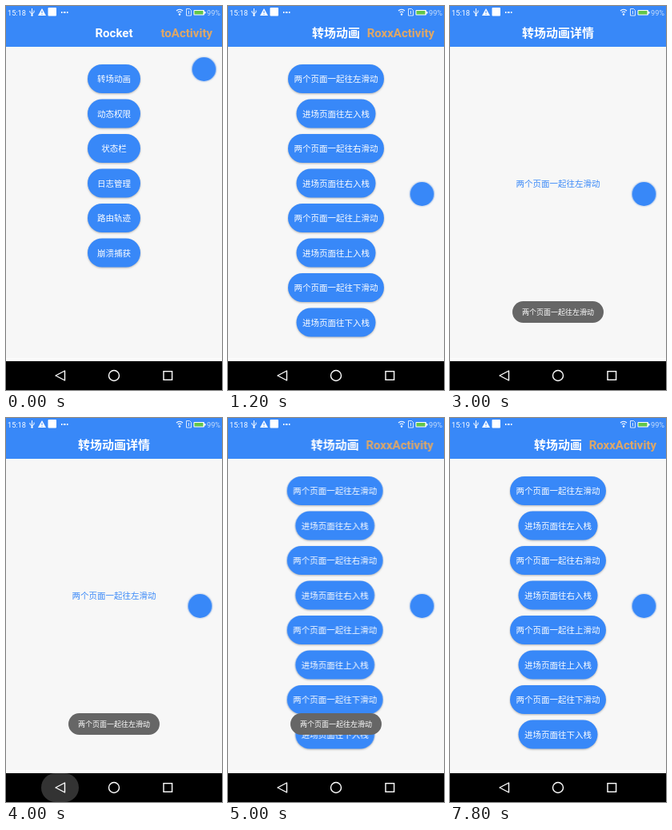
Animation of 270 by 480 pixels, one loop 8 s. Source, as an HTML page:

```html
<!DOCTYPE html>
<html lang="zh-CN">
<head>
<meta charset="utf-8">
<title>转场动画</title>
<style>
html, body { margin: 0; width: 100%; height: 100%; overflow: hidden; background: #f7f7f7; }
svg { display: block; width: 100vw; height: 100vh; }
text { font-family: Roboto, "Noto Sans CJK SC", "Noto Sans CJK", sans-serif; fill: #fff; text-anchor: middle; }
.title { font-size: 15px; font-weight: 700; }
.action { font-size: 15px; font-weight: 700; fill: #dfa766; text-anchor: end; }
.label { font-size: 10.5px; font-weight: 500; }
.detail { font-size: 10.5px; fill: #3888f8; }
.note { font-size: 9px; }
.clock { font-size: 9.2px; text-anchor: start; }
.button, .blue { fill: #3888f8; }
.button { filter: drop-shadow(0 1px 1px #0004); }
.line { fill: none; stroke: #fff; }

#home, #list, #detail, #floater, #toast, #ripple, #before, #after {
  animation: 8s linear infinite;
}
#home { animation-name: home; }
#list { animation-name: list; }
#detail { animation-name: detail; }
#floater { animation-name: floater; }
#toast { animation-name: toast; }
#ripple { animation-name: ripple; transform-origin: 67.5px 462px; }
#before { animation-name: before; }
#after { animation-name: after; }

@keyframes home {
  0%, 5.56% { transform: none; animation-timing-function: cubic-bezier(.37, 0, .63, 1); }
  10.56%, 100% { transform: translateX(270px); }
}
@keyframes list {
  0%, 5.56% { transform: translateX(-270px); animation-timing-function: cubic-bezier(.37, 0, .63, 1); }
  10.56%, 17.5% { transform: translateX(0); animation-timing-function: cubic-bezier(.37, 0, .63, 1); }
  22.5%, 57.74% { transform: translateX(-270px); animation-timing-function: cubic-bezier(.37, 0, .63, 1); }
  62.74%, 100% { transform: translateX(0); }
}
@keyframes detail {
  0%, 17.5% { transform: translateX(270px); animation-timing-function: cubic-bezier(.37, 0, .63, 1); }
  22.5%, 57.74% { transform: translateX(0); animation-timing-function: cubic-bezier(.37, 0, .63, 1); }
  62.74%, 100% { transform: translateX(270px); }
}
@keyframes floater {
  0% { transform: translate(247.5px, 79px); animation-timing-function: ease-in-out; }
  5%, 100% { transform: translate(242.5px, 235px); }
}
@keyframes toast {
  0%, 22.5% { opacity: 0; }
  26.25%, 76% { opacity: 1; }
  79.75%, 100% { opacity: 0; }
}
@keyframes ripple {
  0%, 48.7% { opacity: 0; transform: scale(.6); }
  50%, 52.5% { opacity: 1; transform: none; }
  55%, 100% { opacity: 0; transform: none; }
}
@keyframes before {
  0% { opacity: 1; animation-timing-function: step-end; }
  95%, 100% { opacity: 0; }
}
@keyframes after {
  0% { opacity: 0; animation-timing-function: step-end; }
  95%, 100% { opacity: 1; }
}
</style>
</head>
<body>
<svg viewBox="0 0 270 480" preserveAspectRatio="none">
  <rect width="270" height="480" fill="#f7f7f7"/>
  <rect y="440" width="270" height="4" fill="#fcfcfc"/>
  <rect class="blue" width="270" height="51"/>

  <g id="home">
    <text class="title" x="135" y="39">Rocket</text>
    <text class="action" x="258" y="39">toActivity</text>
  </g>
  <g id="list">
    <text class="title" x="135" y="38.7">转场动画</text>
    <text class="action" x="258" y="39">RoxxActivity</text>
  </g>
  <g id="detail">
    <text class="title" x="135" y="38.7">转场动画详情</text>
    <text class="detail" x="135" y="226">两个页面一起往左滑动</text>
  </g>

  <g id="toast">
    <rect x="78" y="369" width="114" height="27" rx="13.5" fill="#666"/>
    <text class="note" x="135" y="386">两个页面一起往左滑动</text>
  </g>

  <g id="floater">
    <circle r="16.5" fill="#dfe5ee"/>
    <circle class="blue" r="15"/>
  </g>

  <g id="status">
    <g class="clock">
      <text class="clock" id="before" x="2" y="12">15:18</text>
      <text class="clock" id="after" x="2" y="12">15:19</text>
    </g>
    <path class="line" d="M32.5 3V12M30 6V8L32.5 10L35 8V5.5"/>
    <circle cx="32.5" cy="11.5" r="1.2" fill="#fff"/>
    <path d="M45 3L50 12H40Z" fill="#fff"/>
    <path d="M45 6V9M45 10V11" stroke="#3888f8"/>
    <rect x="52.5" y="2" width="10.5" height="10.5" rx="1" fill="#fff"/>
    <path class="line" d="M69 8H70.5M72 8H74.5M76 8H77.5" stroke-width="1.8"/>
    <path class="line" d="M213 6Q217 2.5 221 6M214.8 8Q217 6 219.2 8" stroke-width="1.1"/>
    <circle cx="217" cy="10.5" r="1.2" fill="#fff"/>
    <path class="line" d="M225.5 3.5H229.5L231.5 5.5V12H225.5ZM228.5 6V10" stroke-width=".8"/>
    <rect x="234.5" y="5" width="13.5" height="6.5" rx="1" fill="#fff"/>
    <rect x="235.5" y="6" width="11" height="4.5" fill="#62c64a"/>
    <rect x="248" y="7" width="1.5" height="2.5" fill="#fff"/>
    <text x="251" y="12" font-size="9.2" style="text-anchor:start;fill:#c5dcfa">99%</text>
  </g>

  <g id="navigation">
    <rect y="444" width="270" height="36"/>
    <rect id="ripple" x="44" y="444" width="47" height="36" rx="18" fill="#333"/>
    <g class="line" stroke-width="1.4">
      <path d="M62 462L73.5 456V468Z" stroke-linejoin="round"/>
      <circle cx="135" cy="462" r="6.5"/>
      <rect x="197" y="456.7" width="10.6" height="10.6"/>
    </g>
  </g>
</svg>
<script>
const NS = 'http://www.w3.org/2000/svg';

function add(parent, tag, attributes, content = '') {
  const node = document.createElementNS(NS, tag);
  for (const [key, value] of Object.entries(attributes)) node.setAttribute(key, value);
  node.textContent = content;
  parent.append(node);
}

function addButtons(id, labels) {
  const page = document.getElementById(id);
  labels.forEach((label, row) => {
    const width = Math.max(66, label.length * 10.5 + 15);
    const top = 73 + row * 43.5;
    add(page, 'rect', { class: 'button', x: 135 - width / 2, y: top, width, height: 36, rx: 18 });
    add(page, 'text', { class: 'label', x: 135, y: top + 22 }, label);
  });
}

addButtons('home', ['转场动画', '动态权限', '状态栏', '日志管理', '路由轨迹', '崩溃捕获']);
addButtons('list', [...'左右上下'].flatMap(way => [`两个页面一起往${way}滑动`, `进场页面往${way}入栈`]));
</script>
</body>
</html>
```
